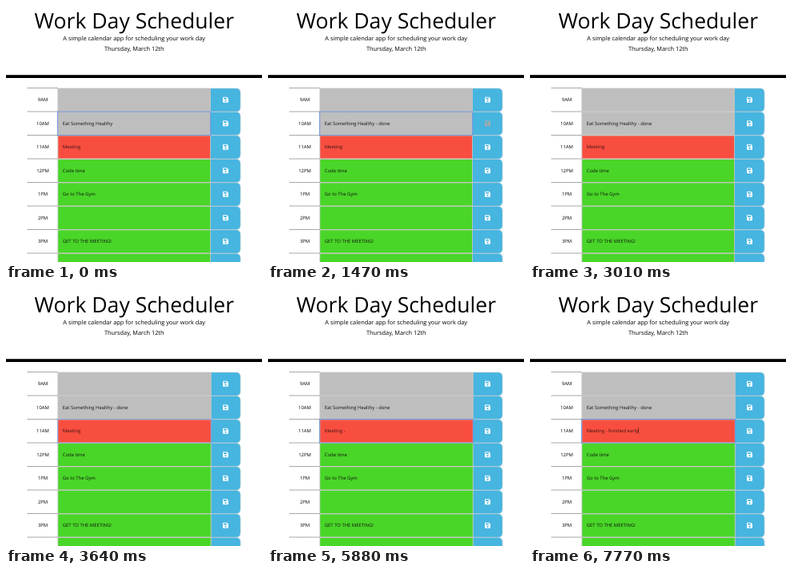
Recreate the animation shown at these times as an HTML page. Size 320 by 320 pixels, loop 8 s.

```html
<!DOCTYPE html>
<html lang="en">
<head>
<meta charset="utf-8">
<title>Work Day Scheduler</title>
<style>
  html, body { margin: 0; width: 100%; height: 100%; overflow: hidden; background: #fff; }
  svg { display: block; width: 100vw; height: 100vh; }
  text { font-family: "Open Sans", "Noto Sans", sans-serif; text-rendering: geometricPrecision; white-space: pre; }
  .mid { text-anchor: middle; }
</style>
</head>
<body>
<svg id="stage" viewBox="0 0 320 320"></svg>
<script>
const LOOP = 8000, TOP = 102.5, PITCH = 29.5, LEFT = 64.9;
const GRAY = '#bebebe', RED = '#f84e40', GREEN = '#49d628', BLUE = '#46b5e0';
const stage = document.getElementById('stage');

function add(tag, attrs, content = '') {
  const el = document.createElementNS('http://www.w3.org/2000/svg', tag);
  for (const key in attrs) el.setAttribute(key, attrs[key]);
  el.textContent = content;
  return stage.appendChild(el);
}
const centered = (x, y, size, content) =>
  add('text', { x, y, 'font-size': size, class: 'mid' }, content);

centered(160.3, 28, 26.56, 'Work Day Scheduler');
centered(160.2, 43.1, 7.38, 'A simple calendar app for scheduling your work day');
centered(160.2, 56.1, 7.38, 'Thursday, March 12th');
add('rect', { x: 0, y: 86.2, width: 320, height: 3.8 });

const rows = [
  ['9AM', GRAY, ''],
  ['10AM', GRAY, 'Eat Something Healthy'],
  ['11AM', RED, 'Meeting'],
  ['12PM', GREEN, 'Code time'],
  ['1PM', GREEN, 'Go to The Gym'],
  ['2PM', GREEN, ''],
  ['3PM', GREEN, 'GET TO THE MEETING!'],
  ['4PM', GREEN, '']
].map(([hour, fill, note], i) => {
  const y = TOP + i * PITCH, base = y + 16.7, h = PITCH - 0.6;
  add('path', { d: `M27 ${y}H64.5`, stroke: '#000', 'stroke-width': 0.6, 'stroke-dasharray': '1.1 .8' });
  centered(46, base, 5.9, hour);
  const button = add('path', { fill: BLUE, stroke: '#a9c3cf', 'stroke-width': 0.6 });
  const field = add('rect', { x: LEFT, y: y + 0.5, height: h, fill, stroke: '#c4c4c4', 'stroke-width': 0.8 });
  const text = add('text', { x: 70.8, y: base, 'font-size': 5.9, fill: fill === RED ? '#3a1512' : '#111' }, note);
  // Floppy disk: body with a cut-out shutter and hub
  const icon = add('path', {
    transform: `translate(271 ${y + 11.3})`, 'fill-rule': 'evenodd', fill: '#fff',
    d: 'M.8 0H5.3L7 1.7V6.2Q7 7 6.2 7H.8Q0 7 0 6.2V.8Q0 0 .8 0ZM1 1V2.8H4.9V1ZM3.5 3.8a1.05 1.05 0 1 0 .01 0Z'
  });
  return { y, h, field, button, text, icon, note };
});

const outline = add('rect', { x: LEFT - 0.3, height: PITCH, fill: 'none', stroke: '#6d94dc', 'stroke-width': 1 });
const caret = add('rect', { width: 0.6, height: 7.4, fill: '#111' });

const sessions = [
  { row: rows[1], added: ' - done', keys: [70, 210, 280, 490, 560, 700, 770] },
  { row: rows[2], added: ' - finished early',
    keys: [5810, 5880, 5950, 6090, 6160, 6300, 6440, 6510, 6650, 6790, 6860, 7000, 7070, 7210, 7350, 7490, 7770] }
];

const ramp = (t, from, to) => Math.min(1, Math.max(0, (t - from) / (to - from)));
const within = (t, from, to) => t >= from && t < to;

function draw(t) {
  const right = t < 3150 ? 255.4 : 256.2;
  for (const { y, h, field, button } of rows) {
    field.setAttribute('width', right - LEFT);
    button.setAttribute('d', `M${right} ${y + 0.5}H287.5q5.5 0 5.5 5.5v${h - 11}q0 5.5 -5.5 5.5H${right}Z`);
  }

  for (const { row, added, keys } of sessions)
    row.text.textContent = row.note + added.slice(0, keys.filter(k => k <= t).length);

  const hover = ramp(t, 1400, 1610) * (1 - ramp(t, 2170, 2450));
  const shade = Math.round(255 * (1 - hover));
  rows[1].icon.setAttribute('fill', `rgb(${shade},${shade},${shade})`);

  const active = t < 3000 ? rows[1] : rows[2];
  outline.setAttribute('y', active.y + 0.1);
  outline.setAttribute('width', right - LEFT + 0.6);
  outline.setAttribute('opacity', t < 3000 ? 1 - ramp(t, 1470, 1620) : 0.7 * (t >= 3640) + 0.3 * ramp(t, 3640, 3780));

  const blink = within(t, 70, 1330) || within(t, 3780, 4340) || within(t, 4830, 5390) || t >= 5950;
  caret.setAttribute('opacity', blink ? 1 : 0);
  caret.setAttribute('x', 70.9 + active.text.getComputedTextLength());
  caret.setAttribute('y', active.y + 10.6);
}

function tick() {
  draw(performance.now() % LOOP);
  requestAnimationFrame(tick);
}
tick();
</script>
</body>
</html>
```
